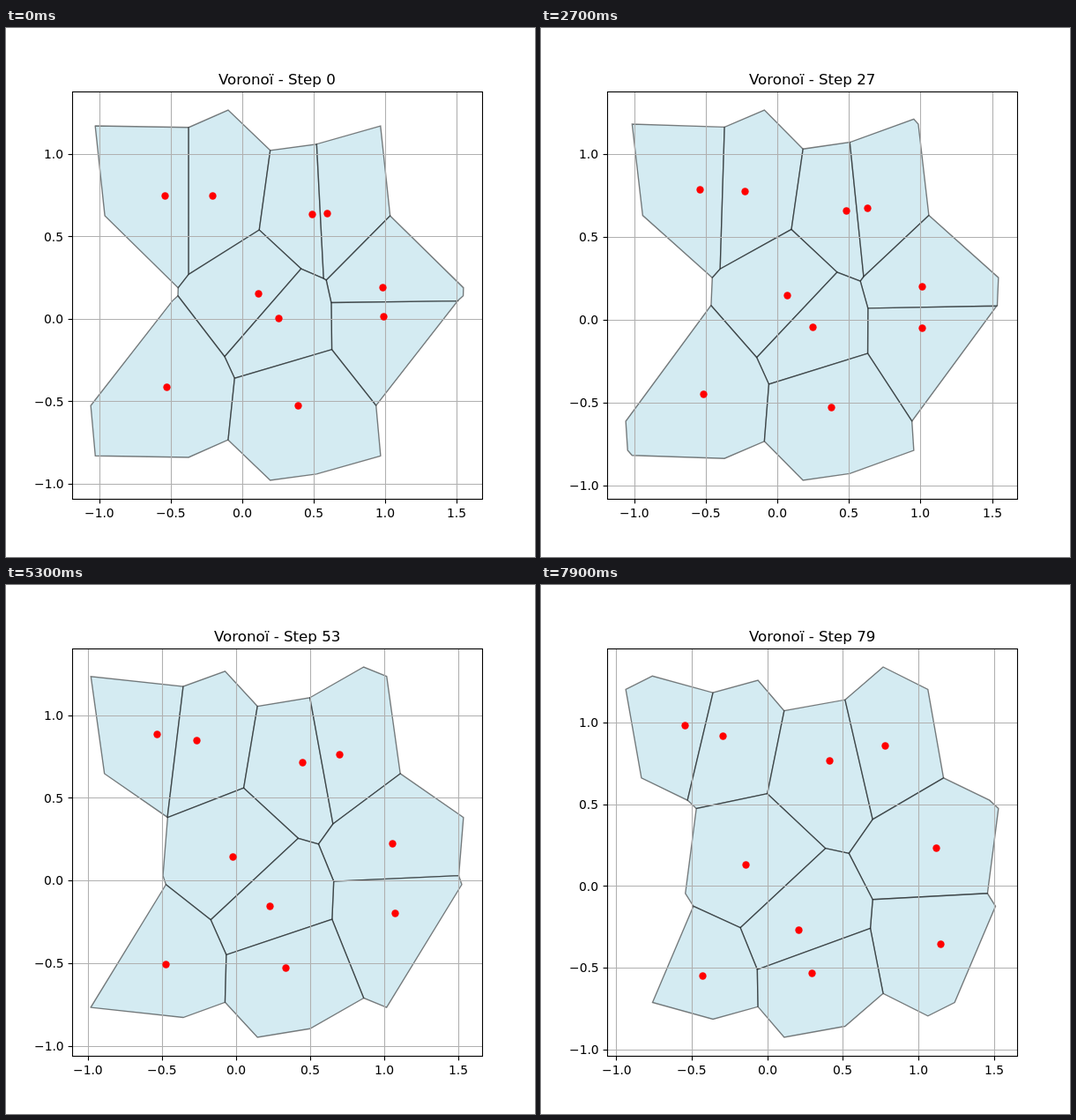
Write an HTML page with a canvas that moves like this. It is 600x600 px and loops after 8000 ms.

```html
<!DOCTYPE html>
<html lang="en">
<head>
<meta charset="utf-8">
<title>Voronoï</title>
<style>
html, body { margin: 0; width: 100%; height: 100%; overflow: hidden; background: #fff; }
canvas { display: block; }
</style>
</head>
<body>
<canvas id="plot" width="600" height="600"></canvas>
<script>
const ctx = document.getElementById('plot').getContext('2d');
const STEPS = 80, STEP_MS = 100, PERIOD = 2, STIFFNESS = 1.02e-3;
const BOX = { left: 75, right: 540, top: 72, bottom: 534 };
const FONT = '"DejaVu Sans", Verdana, sans-serif';

const SEEDS = [
  [-.543, .743], [-.210, .743], [.494, .6305], [.599, .6368], [.988, .191],
  [.990, .0146], [.111, .153], [.259, .004], [-.531, -.417], [.395, -.529]
];

// Keep the part of the polygon nearer to p than to q.
// The third item of a vertex is the neighbour across the edge that starts there.
function clip(poly, p, q) {
  const nx = q[0] - p[0], ny = q[1] - p[1];
  const side = v => (v[0] - (p[0] + q[0]) / 2) * nx + (v[1] - (p[1] + q[1]) / 2) * ny;
  const out = [];
  poly.forEach((a, i) => {
    const b = poly[(i + 1) % poly.length], da = side(a), db = side(b);
    if (da <= 0) out.push(a);
    if (da * db < 0) {
      const f = da / (da - db);
      out.push([a[0] + f * (b[0] - a[0]), a[1] + f * (b[1] - a[1]), da < 0 ? q : a[2]]);
    }
  });
  return out;
}

// Voronoi cells on a torus.
function voronoi(seeds) {
  const shifts = [-PERIOD, 0, PERIOD];
  const tiled = shifts.flatMap(dx => shifts.flatMap(dy =>
    seeds.map(([x, y], i) => [x + dx, y + dy, i])));
  return seeds.map(p => {
    let cell = [[-2, -2], [2, -2], [2, 2], [-2, 2]].map(([x, y]) => [p[0] + x, p[1] + y]);
    for (const q of tiled) {
      if (Math.hypot(q[0] - p[0], q[1] - p[1]) > 1e-9) cell = clip(cell, p, q);
    }
    return cell;
  });
}

const edges = cell => cell.map((a, i) => [a, cell[(i + 1) % cell.length]]);
const area = cell => edges(cell).reduce((sum, [a, b]) => sum + a[0] * b[1] - b[0] * a[1], 0) / 2;

// Small cells push against large ones: the force is the gradient of the squared areas.
function forces(seeds, cells) {
  const areas = cells.map(area);
  return seeds.map((p, i) => {
    const force = [0, 0];
    for (const [a, b] of edges(cells[i])) {
      const q = a[2];
      const push = (areas[q[2]] - areas[i]) * Math.hypot(b[0] - a[0], b[1] - a[1]) /
        Math.hypot(q[0] - p[0], q[1] - p[1]);
      for (const k of [0, 1]) force[k] += push * ((a[k] + b[k]) / 2 - p[k]);
    }
    return force;
  });
}

// The seeds start at rest and move without friction.
function simulate() {
  const states = [], speeds = SEEDS.map(() => [0, 0]);
  let seeds = SEEDS;
  while (states.length < STEPS) {
    const cells = voronoi(seeds);
    states.push({ seeds, cells });
    const push = forces(seeds, cells);
    seeds = seeds.map((p, i) => p.map((v, k) => v + (speeds[i][k] += STIFFNESS * push[i][k])));
  }
  return states;
}

// Linear axis fitted to the data with a 5% margin.
function makeAxis(values, from, to) {
  const min = Math.min(...values), max = Math.max(...values), pad = (max - min) * .05;
  const lo = min - pad, hi = max + pad;
  const ticks = [];
  for (let v = Math.ceil(lo * 2) / 2; v <= hi; v += .5) ticks.push(v);
  return { ticks, map: v => from + (v - lo) / (hi - lo) * (to - from) };
}

const snap = v => Math.floor(v + .5) + .5;
const label = v => (v < 0 ? '\u2212' : '') + Math.abs(v).toFixed(1);

function line(x1, y1, x2, y2, color) {
  ctx.strokeStyle = color;
  ctx.lineWidth = 1.11;
  ctx.beginPath();
  ctx.moveTo(x1, y1);
  ctx.lineTo(x2, y2);
  ctx.stroke();
}

// Text whose width is placed around x: anchor 0 is left, .5 centre, 1 right.
function text(str, x, y, size, anchor) {
  ctx.font = `${size}px ${FONT}`;
  ctx.fillStyle = '#000';
  ctx.fillText(str, Math.round(x - ctx.measureText(str).width * anchor), Math.round(y));
}

function draw(step) {
  const { seeds, cells } = states[step], corners = cells.flat();
  const xAxis = makeAxis(corners.map(v => v[0]), BOX.left, BOX.right);
  const yAxis = makeAxis(corners.map(v => v[1]), BOX.bottom, BOX.top);

  ctx.fillStyle = '#fff';
  ctx.fillRect(0, 0, 600, 600);

  ctx.fillStyle = 'rgba(173, 216, 230, .52)';
  ctx.strokeStyle = 'rgba(0, 0, 0, .5)';
  ctx.lineWidth = 1.39;
  for (const cell of cells) {
    ctx.beginPath();
    for (const [x, y] of cell) ctx.lineTo(xAxis.map(x), yAxis.map(y));
    ctx.closePath();
    ctx.fill();
    ctx.stroke();
  }

  for (const v of xAxis.ticks) {
    const x = xAxis.map(v), sx = snap(x);
    line(sx, BOX.top, sx, BOX.bottom, '#b0b0b0');
    line(sx, BOX.bottom + .5, sx, BOX.bottom + 5.4, '#000');
    text(label(v), x, 555, 13.89, .5);
  }
  for (const v of yAxis.ticks) {
    const y = yAxis.map(v), sy = snap(y);
    line(BOX.left, sy, BOX.right, sy, '#b0b0b0');
    line(BOX.left - 4.4, sy, BOX.left + .5, sy, '#000');
    text(label(v), 65.3, y + 5.1, 13.89, 1);
  }

  ctx.fillStyle = '#f00';
  for (const [x, y] of seeds) {
    ctx.beginPath();
    ctx.arc(Math.floor(xAxis.map(x)) + .5, Math.floor(yAxis.map(y)) + .5, 4.17, 0, 2 * Math.PI);
    ctx.fill();
  }

  ctx.strokeStyle = '#000';
  ctx.lineWidth = 1.11;
  ctx.strokeRect(BOX.left + .5, BOX.top + .5, BOX.right - BOX.left, BOX.bottom - BOX.top);
  text(`Voronoï - Step ${step}`, 307.5, 64, 16.67, .5);
}

const states = simulate();
const start = performance.now();
function frame() {
  draw(Math.floor((performance.now() - start) / STEP_MS) % STEPS);
  requestAnimationFrame(frame);
}
frame();
</script>
</body>
</html>
```
